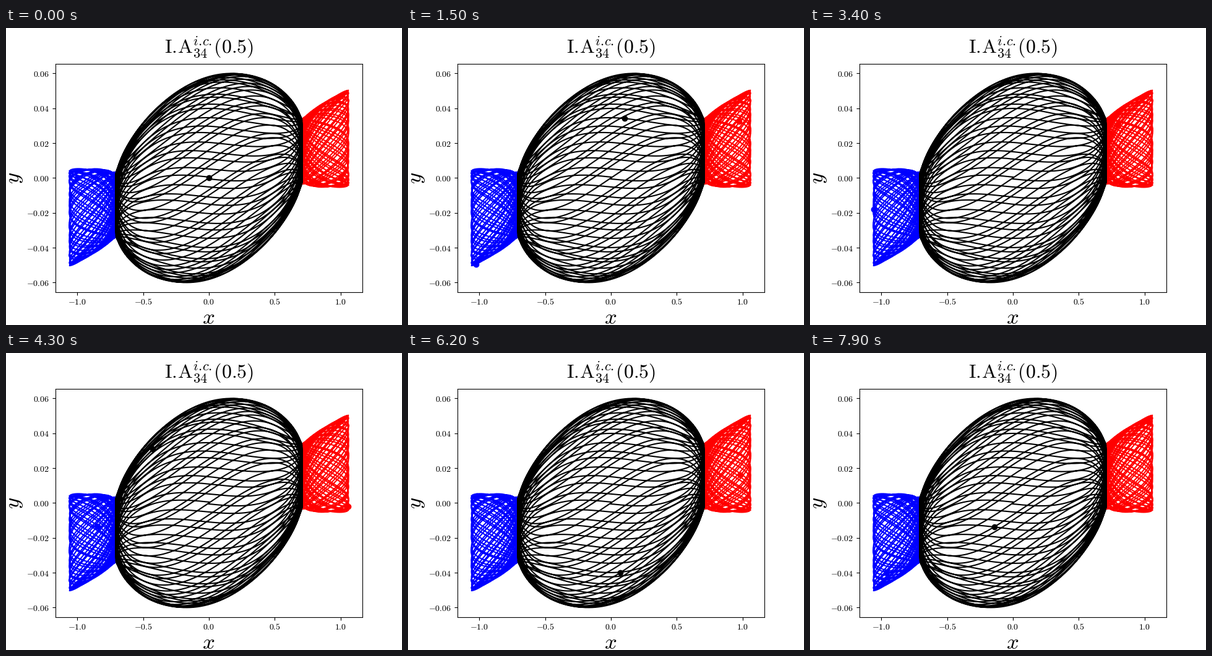
Write a matplotlib script that moves like this. It is 640 by 480 pixels and loops after 8000 ms.

```python
import numpy as np
import matplotlib.pyplot as plt
from matplotlib.animation import FuncAnimation

# Planar three-body orbit: two unit masses, a light one between them, G = 1.
# Positions and velocities are complex; the centre of mass stays at 0.
M = 0.5
HALF_LAPS = 34          # centre crossings of the light body in half a period
PERIOD_FRAMES = 200
FRAMES = 80
PEAK = 0.0597           # height reached by the light body
STEP = 0.0125
WEIGHT = 100
C = 1 / (2 - 2 ** (1 / 3))
YOSHIDA = (C, 1 - 2 * C, C)


def kinetic(w1, w2):
    return 0.5 * (abs(w1) ** 2 + abs(w2) ** 2 + abs(w1 + w2) ** 2 / M)


def advance(state, h, bound):
    """One fourth-order step of the logarithmic-Hamiltonian leapfrog."""
    z1, z2, w1, w2, t = state
    for c in YOSHIDA:
        d = 0.5 * c * h / (kinetic(w1, w2) + bound)
        z1 += w1 * d
        z2 += w2 * d
        t += d
        z3 = -(z1 + z2) / M
        a, b, e = z2 - z1, z3 - z1, z3 - z2
        ra, rb, re = abs(a), abs(b), abs(e)
        k = c * h / (1 / ra + M / rb + M / re)
        fa, fb, fe = a / ra ** 3, M * b / rb ** 3, M * e / re ** 3
        w1 += k * (fa + fb)
        w2 += k * (fe - fa)
        d = 0.5 * c * h / (kinetic(w1, w2) + bound)
        z1 += w1 * d
        z2 += w2 * d
        t += d
    return z1, z2, w1, w2, t


def centre(state, bound):
    """Move a state to the nearby instant when the light body is at x = 0."""
    for _ in range(4):
        z1, z2, w1, w2, _t = state
        dt = -(z1 + z2).real / (w1 + w2).real
        state = advance(state, dt * (kinetic(w1, w2) + bound), bound)
    return state


def fly(v1, v2, laps=HALF_LAPS):
    """All states from the collinear start, and those at centre crossings."""
    v = complex(v1, v2)
    state = (-1 + 0j, 1 + 0j, v, v, 0.0)
    bound = 0.5 + 2 * M - kinetic(v, v)
    path, marks, side = [state], [], 1
    for _ in range(500 * laps):
        state = advance(state, STEP, bound)
        if side * (state[0] + state[1]).real < 0:
            side = -side
            marks.append(centre(state, bound))
            if len(marks) == laps:
                break
        path.append(state)
    path.append(marks[-1])
    return path, marks


def height(state):
    return -(state[0] + state[1]).imag / M


def growth(state):
    """Rate at which the outer pair spreads; 0 at a symmetric crossing."""
    z1, z2, w1, w2, _ = state
    return ((z2 - z1).conjugate() * (w2 - w1)).real


def peak(path):
    return max(abs(height(s)) for s in path)


def balance(v2):
    """Horizontal speed that makes the first crossing symmetric."""
    a, b = 0.28, 0.29
    fa = growth(fly(a, v2, 1)[1][0])
    for _ in range(7):
        fb = growth(fly(b, v2, 1)[1][0])
        if abs(fb - fa) < 1e-13:
            break
        a, fa, b = b, fb, float(np.clip(b - fb * (b - a) / (fb - fa), 0.26, 0.31))
    return b


def refine(v, goal, room, rounds):
    """Gauss-Newton: steady x swing at every crossing while goal becomes 0."""
    def residual(u):
        path, marks = fly(*u)
        return np.array([growth(s) for s in marks] + [WEIGHT * goal(path)])

    start, eps = v, 1e-6
    for _ in range(rounds):
        r = residual(v)
        jac = np.column_stack([(residual(v + d) - r) / eps for d in np.eye(2) * eps])
        v = v - np.linalg.lstsq(jac, r, rcond=None)[0]
        v = np.clip(v, start - room, start + room)
    return v


def solve():
    v2 = 0.05
    v1 = balance(v2)
    v2 *= PEAK / peak(fly(v1, v2)[0])
    v = np.array([balance(v2), v2])
    v = refine(v, lambda path: peak(path) - PEAK, np.array([0.008, 0.1 * v2]), 3)
    v = refine(v, lambda path: height(path[-1]), np.array([0.004, 0.015 * v2]), 4)
    v[1] *= np.sign(height(fly(*v, 1)[1][0]))
    return v


path = np.array(fly(*solve())[0])
z1, z2 = path[:, 0], path[:, 1]
z3 = -(z1 + z2) / M
times = path[:, 4].real
dt = 2 * times[-1] / PERIOD_FRAMES

plt.rcParams["mathtext.fontset"] = "cm"
fig, ax = plt.subplots(figsize=(6.4, 4.8), dpi=100)
fig.subplots_adjust(left=0.125, right=0.9, bottom=0.11, top=0.88)

# The other half of the orbit is the first one turned by 180 degrees.
bodies = [(z1, z2, "blue"), (z2, z1, "red"), (z3, z3, "black")]
for z, twin, color in bodies:
    loop = np.concatenate([-twin[:0:-1], z])
    ax.plot(loop.real, loop.imag, color=color, lw=1.5)
dots = [ax.plot([], [], "o", color=color, ms=6)[0] for _, _, color in bodies]

ax.set_xlim(-1.1645, 1.1645)
ax.set_ylim(-0.0656, 0.0656)
xt = [0.5 * i for i in range(-2, 3)]
yt = [0.02 * i for i in range(-3, 4)]
ax.set_xticks(xt, [f"${v:.1f}$" for v in xt])
ax.set_yticks(yt, [f"${v:.2f}$" for v in yt])
ax.tick_params(axis="x", pad=3)

fig.text(0.5125, 1 - 40 / 480, r"$\mathrm{I.\!A}_{34}^{i.\!c.\!}(0.5)$",
         size=23, ha="center", va="baseline")
fig.text(0.511, 1 - 478 / 480, "$x$", size=25, ha="center", va="baseline")
fig.text(21 / 640, 0.495, "$y$", size=25, rotation=90, ha="center",
         va="baseline", rotation_mode="anchor")


def update(n):
    t = n * dt
    for dot, (z, _, _) in zip(dots, bodies):
        dot.set_data([np.interp(t, times, z.real)], [np.interp(t, times, z.imag)])
    return dots


anim = FuncAnimation(fig, update, frames=FRAMES, interval=100, repeat=True)
plt.show()
```
